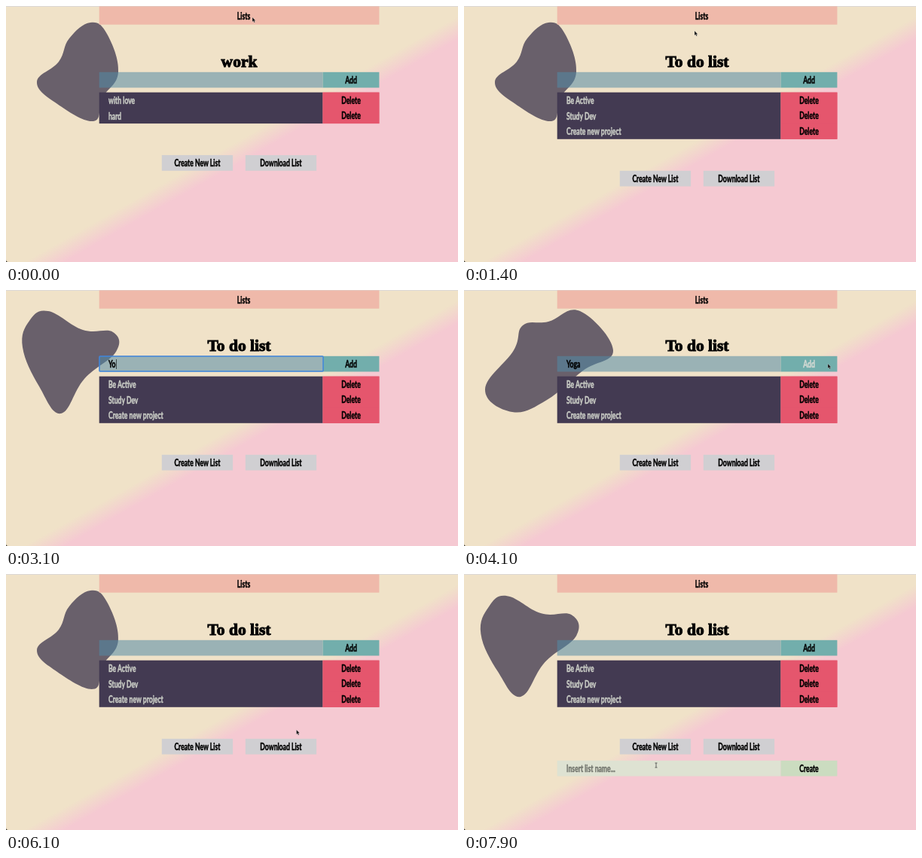
Write an HTML page that moves like this. It is 600 px wide and 340 px high and loops after 8000 ms.

```html
<!DOCTYPE html>
<html lang="en">
<head>
<meta charset="utf-8">
<title>Lists</title>
<style>
html, body { margin: 0; width: 100%; height: 100%; overflow: hidden; }
body { background: linear-gradient(to bottom right, #f0e2c8 52%, #f5c9d2 56.5%); }
svg { display: block; width: 100%; height: 100%; }
text { font: bold 12.5px Lato, sans-serif; stroke-width: .5; }
.title { font: bold 21.5px "Liberation Serif", serif; stroke: #000; stroke-width: 1; }
</style>
</head>
<body>
<svg id="stage" viewBox="0 0 600 340"></svg>
<script>
const LOOP = 8000, STEP = 100, MORPH = 4650;
const LEFT = 123.7, SPLIT = 420.6, RIGHT = 495.4;
const INPUT_Y = 87.8, LIST_Y = 114.7, ROW = 20.7;
const FIELD_W = SPLIT - LEFT, SIDE_W = RIGHT - SPLIT;
const TEAL = '#72aeac', RED = '#e5566d', GREY = '#d0cfd2', PALE = '#d5dad4', INK = '#000';
const stage = document.getElementById('stage');

// Key points of the blob, clockwise from the upper left
const points = s => s.split(' ').map(p => p.split(',').map(Number));
const bell = points('84,43 112,22 134,37 149,88 128,122 116,153 68,130 41,101 70,74');
const pebble = points('68,53 106,40 129,53 133,92 130,112 114,132 78,128 43,110 46,75');
const heart = points('56,28 102,53 142,56 146,82 104,118 73,164 44,128 22,76 31,41');
const bean = points('78,47 112,42 154,28 198,80 158,107 110,146 64,162 28,132 66,80');
const poses = [
  [0, bell], [700, pebble], [1400, bell], [2500, pebble],
  [3100, heart], [4100, bean], [MORPH, bell]
];

// Pointer moves: start, end, destination
const moves = [
  [400, 900, [306, 33]], [1700, 2300, [250, 98]], [3600, 4000, [483, 98]],
  [4500, 5200, [445, 190]], [5700, 6700, [276, 238]], [7200, 7600, [255, 254]]
];

const clamp = (v, lo, hi) => Math.min(hi, Math.max(lo, v));
const mix = (a, b, e) => a.map((v, k) => v + (b[k] - v) * e);

function ease(t, from, to) {
  const u = clamp((t - from) / (to - from), 0, 1);
  return u * u * (3 - 2 * u);
}

const pointerAt = t =>
  moves.reduce((pos, [from, to, goal]) => mix(pos, goal, ease(t, from, to)), [327, 15]);

function blobAt(t) {
  const time = t % MORPH;
  const next = poses.findIndex(([at]) => at > time);
  const [t0, a] = poses[next - 1], [t1, b] = poses[next];
  const e = ease(time, t0, t1);
  return a.map((p, i) => mix(p, b[i], e));
}

function smoothPath(pts) {
  const n = pts.length, pull = .2;
  const pt = i => pts[(i + n) % n];
  return 'M' + pts[0] + pts.map((p, i) => {
    const q = pt(i + 1), before = pt(i - 1), after = pt(i + 2);
    const out = p.map((v, k) => v + (q[k] - before[k]) * pull);
    const into = q.map((v, k) => v - (after[k] - p[k]) * pull);
    return `C${out} ${into} ${q}`;
  }).join('') + 'Z';
}

const rect = (x, y, w, h, fill, extra = '') =>
  `<rect x="${x}" y="${y}" width="${w}" height="${h}" fill="${fill}" ${extra}/>`;

// One condensed face for all interface labels
const label = (s, x, y, fill = INK, anchor = 'middle') =>
  `<text transform="translate(${x} ${y + 4.5}) scale(.69 1)" fill="${fill}" stroke="${fill}" text-anchor="${anchor}">${s}</text>`;

function draw(t) {
  const [px, py] = pointerAt(t);
  const over = (x, y, w, h) => px >= x && px <= x + w && py >= y && py <= y + h;

  function button(s, x, y, w, fill, hotColor, grow = 1) {
    const hot = over(x, y, w, ROW), g = hot ? grow : 0;
    return rect(x - g, y - g / 2, w + 2 * g, ROW + g, fill) +
      label(s, x + w / 2, y + ROW / 2, hot ? hotColor : INK);
  }

  const first = t < 1000, creating = t >= 7300;
  const focused = t >= 2400 && t < 3900, added = t >= 4300;
  const items = first ? ['with love', 'hard'] : ['Be Active', 'Study Dev', 'Create new project'];
  if (added && t < 5700) items.push('Yoga');
  const typed = added ? '' : 'Yoga'.slice(0, clamp(Math.floor((t - 2600) / 250), 0, 4));

  const listH = items.length * ROW;
  const buttonY = LIST_Y + listH + 42, createY = buttonY + 29;

  let s = rect(0, 0, 600, 1, '#dcd9d8') + '<path d="M0 337Q0 340 3 340H0Z" fill="#222"/>' +
    `<path d="${smoothPath(blobAt(t))}" fill="#69606b"/>` +
    rect(LEFT, .5, RIGHT - LEFT, 24.2, '#efb9aa') + label('Lists', 315.5, 13.5) +
    `<text class="title" x="309.5" y="81" text-anchor="middle">${first ? 'work' : 'To do list'}</text>` +
    rect(LEFT, INPUT_Y, FIELD_W, ROW, 'rgba(82,139,167,.54)') +
    button('Add', SPLIT, INPUT_Y, SIDE_W, TEAL, PALE, 0) +
    label(typed + (focused ? '<tspan stroke="none" font-weight="400">|</tspan>' : ''), 136, 98.5, INK, 'start');
  if (focused)
    s += rect(124, 88, 297, 20, 'none', 'stroke="#3f85dc" stroke-width="1.5" rx="1"');

  s += rect(LEFT, LIST_Y, FIELD_W, listH, '#433a52') + rect(SPLIT, LIST_Y, SIDE_W, listH, RED);
  items.forEach((item, i) => {
    const y = LIST_Y + i * ROW;
    s += label(item, 136, y + 10.6, '#c9ccc5', 'start') + button('Delete', SPLIT, y, SIDE_W, RED, PALE);
  });

  s += button('Create New List', 206.8, buttonY, 94.3, GREY, TEAL) +
    button('Download List', 317.8, buttonY, 94.3, GREY, TEAL);
  if (creating)
    s += rect(LEFT, createY, FIELD_W, ROW, '#dee2d2') +
      label('Insert list name...', 136, createY + 10.5, '#74776f', 'start') +
      button('Create', SPLIT, createY, SIDE_W, '#cbdcc0', INK);

  const beam = over(LEFT, INPUT_Y, FIELD_W, ROW) || creating && over(LEFT, createY, FIELD_W, ROW);
  const hidden = t >= 2700 && t < 3600;
  if (!hidden) {
    const shape = beam
      ? '<path d="M-1.5-3H1.5M0-3V3M-1.5 3H1.5" fill="none" stroke="#444" stroke-width=".8"/>'
      : '<path d="M0 0V6L1.4 4.8L2.4 7L3.5 6.5L2.5 4.4H4.3Z" fill="#111" stroke="#ddd" stroke-width=".3"/>';
    s += `<g transform="translate(${px} ${py})">${shape}</g>`;
  }
  stage.innerHTML = s;
}

function tick() {
  requestAnimationFrame(tick);
  // Wrapped to stay within the loop for any clock value
  const now = ((performance.now() + 1) % LOOP + LOOP) % LOOP;
  draw(Math.floor(now / STEP) * STEP);
}
requestAnimationFrame(tick);
</script>
</body>
</html>
```
